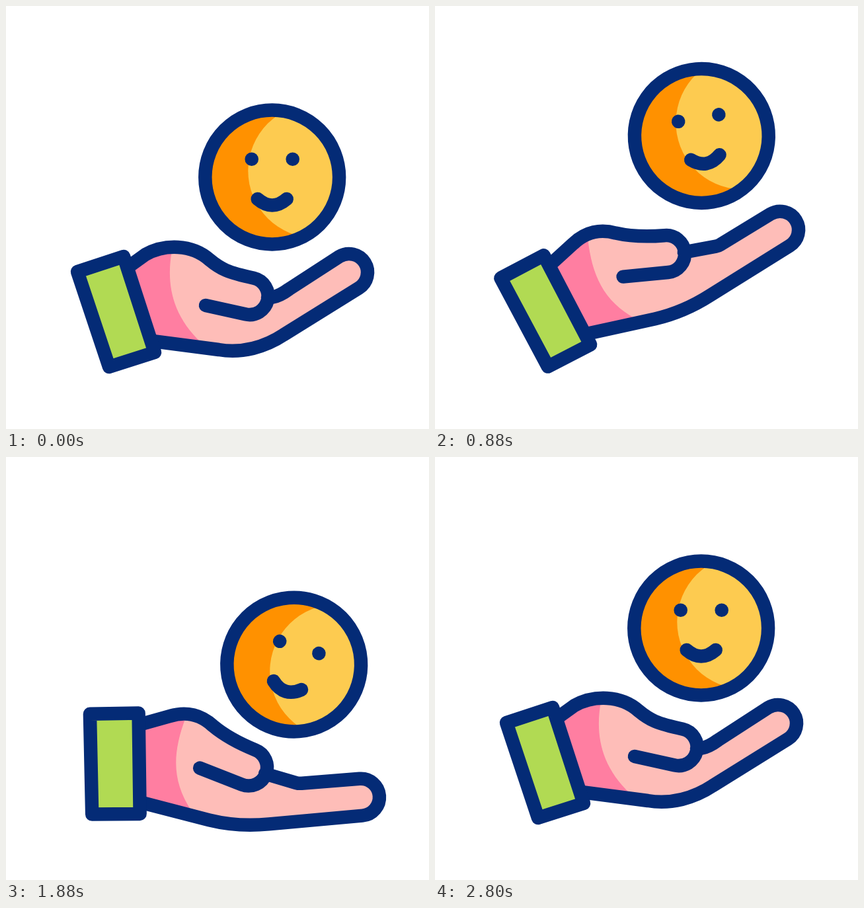
An HTML page with a canvas for the animation above (3.22 s loop, 640 by 640 pixels).

```html
<!DOCTYPE html>
<html lang="en">
<head>
<meta charset="utf-8">
<title>Hand and smiling ball</title>
<style>
html, body { margin: 0; width: 100%; height: 100%; overflow: hidden; background: #fff; }
canvas { display: block; width: 100vmin; height: 100vmin; }
</style>
</head>
<body>
<canvas id="stage" width="640" height="640"></canvas>
<script>
const ctx = document.getElementById('stage').getContext('2d');
const NAVY = '#042b76', LOOP = 3220, HALF = 1600;

// Both poses of the hand share one command structure, so their numbers can be blended.
const OPEN = {
  top: 'M186 394L225 369C247 354 270 354 291 364C315 374 340 378 363 380A1 1 0 0 1 359.3 436',
  thumb: 'L291 431',
  knuckle: '388 410',
  finger: 'L437 409.3C441 409.2 441 409.2 445 407.5L526.6 375A1 1 0 0 1 547.3 427' +
    'L416 481C390 492 362 500 328 502L220 507',
  shade: 'M248 366C245 420 255 462 299 497L299 540L150 540L150 366Z'
};
const CUPPED = {
  top: 'M186 394L211 376C240 360 281 360 308 384C325 398 335 403 375 411.7A1 1 0 0 1 362 466.3',
  thumb: 'L302 453',
  knuckle: '396 441',
  finger: 'L402 441C408 440 418 436 428 428.5L504.2 379.2A1 1 0 0 1 533.8 426.8' +
    'L420 497.5C392 516 357 526 322 520L222 507',
  shade: 'M251 370C243 415 248 465 296 510L296 540L150 540L150 370Z'
};
const CUFF = new Path2D('M108 402L178 379L225 524L156 546Z');

const REST = { x: 0, y: 0, turn: 0 };
const LOW = { x: 38.4, y: 64, turn: 20 };
const HIGH = { x: 0.2, y: -64, turn: -10 };

const lerp = (a, b, k) => a + (b - a) * k;
const smooth = k => k * k * (3 - 2 * k);

// cubic-bezier(.167, 0, 0, 1)
function settle(u) {
  let lo = 0, hi = 1;
  for (let i = 0; i < 30; i++) {
    const s = (lo + hi) / 2;
    if (0.5 * (1 - s) ** 2 * s + s ** 3 < u) lo = s; else hi = s;
  }
  return smooth(lo);
}

function blend(key, k) {
  const goal = CUPPED[key].match(/[\d.]+/g);
  let i = 0;
  return OPEN[key].replace(/[\d.]+/g, n => lerp(+n, +goal[i++], k));
}

function poseAt(t) {
  const second = t >= HALF;
  const u = second ? t - HALF : t;
  let from = REST, to = REST, k = 0, cup = second ? 0 : 1;
  if (u < 600) {
    from = REST; to = LOW; k = settle(u / 600);
    cup = second ? 0 : 1 - k;
  } else if (u < 900) {
    from = LOW; to = HIGH; k = smooth((u - 600) / 300);
    cup = 0;
  } else {
    from = HIGH; to = REST; k = smooth(Math.min(1, (u - 900) / 300));
    cup = second ? k : 0;
  }
  return {
    x: lerp(from.x, to.x, k),
    y: lerp(from.y, to.y, k),
    turn: lerp(from.turn, to.turn, k) * Math.PI / 180,
    cup
  };
}

function fill(path, color) {
  ctx.fillStyle = color;
  ctx.fill(path);
}

function disc(x, y, r) {
  const path = new Path2D();
  path.arc(x, y, r, 0, 2 * Math.PI);
  return path;
}

function drawHand(turn, cup) {
  const top = blend('top', cup), thumb = blend('thumb', cup);
  const knuckle = blend('knuckle', cup), finger = blend('finger', cup);
  const body = new Path2D(top + 'L' + knuckle + finger + 'Z');
  ctx.save();
  ctx.translate(161, 458);
  ctx.rotate(turn);
  ctx.translate(-161, -458);
  fill(body, '#febdb8');
  ctx.save();
  ctx.clip(body);
  fill(new Path2D(blend('shade', cup)), '#ff7ea1');
  ctx.restore();
  ctx.stroke(new Path2D(top + thumb + 'M' + knuckle + finger));
  fill(CUFF, '#b1da53');
  ctx.stroke(CUFF);
  ctx.restore();
}

function drawBall(x, y, turn) {
  const ball = disc(0, 0, 101.4);
  ctx.save();
  ctx.translate(402.7 + x, 259 + y);
  ctx.rotate(turn);
  fill(ball, '#ff9100');
  ctx.save();
  ctx.clip(ball);
  fill(disc(65, -9.5, 101.4), '#fdcb50');
  ctx.restore();
  ctx.stroke(ball);
  fill(disc(-31, -27.3, 10.3), NAVY);
  fill(disc(31, -27.3, 10.3), NAVY);
  ctx.stroke(new Path2D('M-22 33Q0 52 22 33'));
  ctx.restore();
}

function frame() {
  const pose = poseAt(performance.now() % LOOP);
  ctx.fillStyle = '#fff';
  ctx.fillRect(0, 0, 640, 640);
  ctx.strokeStyle = NAVY;
  ctx.lineWidth = 20.5;
  ctx.lineCap = ctx.lineJoin = 'round';
  drawHand(pose.turn, pose.cup);
  drawBall(pose.x, pose.y, pose.turn);
  requestAnimationFrame(frame);
}
frame();
</script>
</body>
</html>
```
